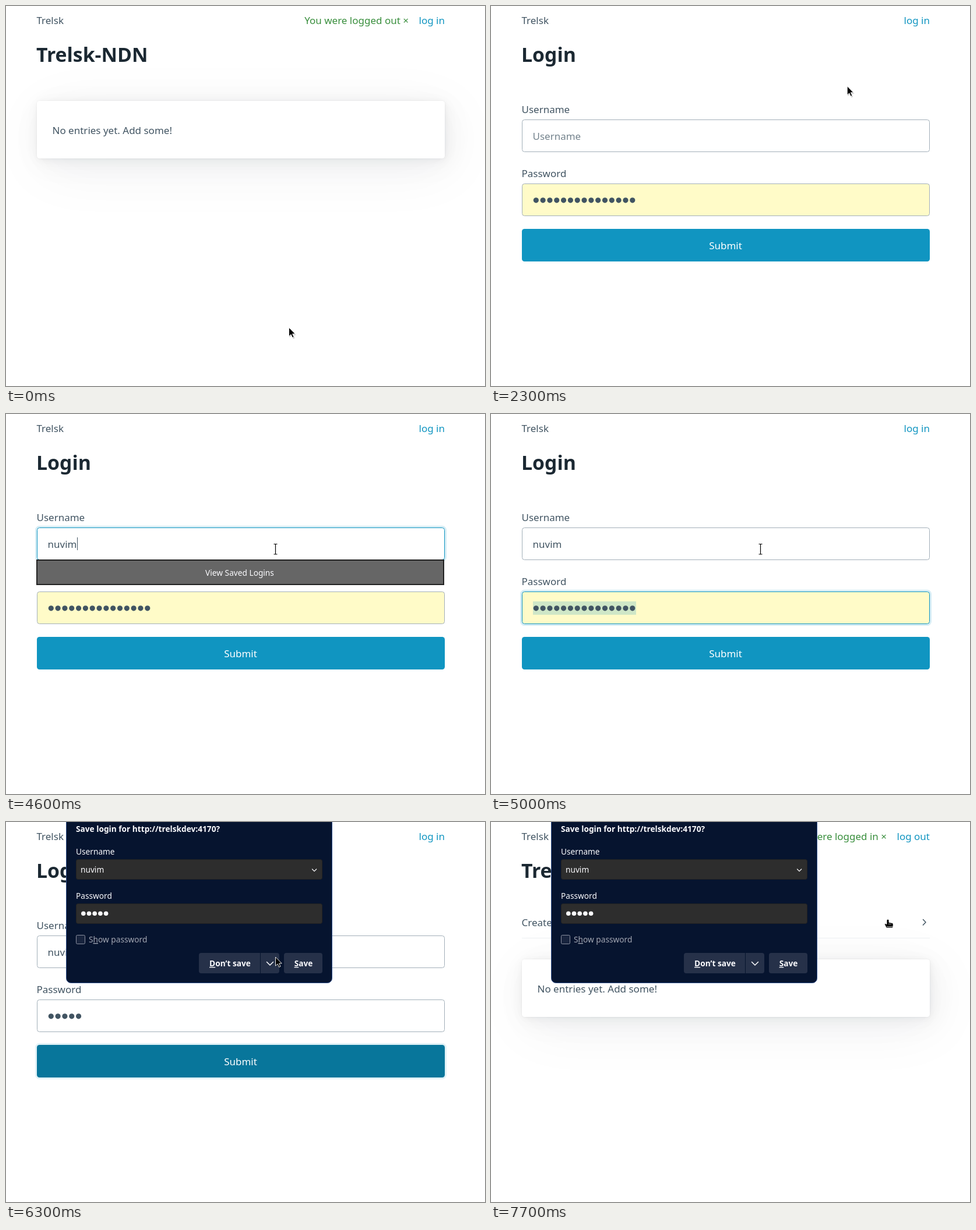
Write an HTML page that moves like this. It is 822 px wide and 653 px high and loops after 8000 ms.

```html
<!DOCTYPE html>
<html lang="en">
<head>
<meta charset="utf-8">
<title>Login demo</title>
<style>
  html, body { margin: 0; width: 100%; height: 100%; overflow: hidden; background: #fff; }
  svg { position: absolute; left: 0; top: 0; display: block; }
  text { font: 17px "Noto Sans", sans-serif; fill: #415462; white-space: pre; }
  .h1 { font-size: 33.8px; font-weight: 700; fill: #1b2832; }
  .end { text-anchor: end; }
  .mid { text-anchor: middle; }
  .small, #pop text { font-size: 13.7px; fill: #fbfbfe; }
  #pop .bold { font-weight: 700; }
  #pop .dim { fill: #a3a7b3; }
  .u { text-decoration: underline; }
  #msg { fill: #388e3c; }
  #card {
    position: absolute; left: 53px; width: 700px; height: 99px;
    border-radius: 4.5px; background: #fff;
  }
  .ring { fill: none; stroke: #1095c1; stroke-width: 3; }
  .line { fill: none; stroke-width: 1.5; stroke-linecap: round; stroke-linejoin: round; }
  .field { fill: #2d2d2d; stroke: #222; }
  .btn { fill: #263149; }
  .btn.over { fill: #434d66; }
</style>
</head>
<body>
<div id="card"></div>
<svg width="822" height="653" viewBox="0 0 822 653">
  <text x="52.5" y="31">Trelsk</text>
  <text id="msg" class="end" y="31"></text>
  <text id="link" class="end" x="753" y="31"></text>
  <text id="title" class="h1" x="52" y="96"></text>

  <text id="empty" x="79.5">No entries yet. Add some!</text>
  <g id="create">
    <text x="52.5" y="179">Create new entry</text>
    <path class="line" d="M741.5 167.5l4.5 4.8l-4.5 4.8" stroke="#415462"/>
    <path d="M53 199.5H753" stroke="#edf0f3"/>
  </g>

  <g id="form">
    <text x="52.5" y="184">Username</text>
    <rect id="nameRing" class="ring" x="51.5" y="193.5" width="703" height="59" rx="6"/>
    <rect id="nameBox" x="53.5" y="195.5" width="699" height="55" rx="4" fill="#fff"/>
    <text id="name" x="71.5" y="230"></text>
    <text x="52.5" y="294">Password</text>
    <rect id="passRing" class="ring" x="51.5" y="303.5" width="703" height="59" rx="6"/>
    <rect id="passBox" x="53.5" y="305.5" width="699" height="55" rx="4"/>
    <rect id="sel" x="72" y="322" width="177" height="23" fill="#1095c1" fill-opacity=".2"/>
    <g id="dots" fill="#415462"></g>
    <rect id="caret" width="1" height="22" fill="#415462"/>
    <rect id="subRing" class="ring" x="51.5" y="381.5" width="703" height="59" rx="6"/>
    <rect id="subBox" x="53" y="383" width="700" height="56" rx="4.5"/>
    <text class="mid" x="402.5" y="418" style="fill:#fff">Submit</text>
    <g id="drop">
      <rect x="53" y="251" width="698" height="42" fill="#666" stroke="#222" stroke-width="2"/>
      <text class="small mid" x="401" y="278">View Saved Logins</text>
    </g>
  </g>

  <g id="pop">
    <rect x="103.5" y="-20" width="456" height="296.5" rx="8" fill="#06142f" stroke="#2f4f8c"/>
    <text class="bold" x="120" y="17">Save login for http://trelskdev:4170?</text>
    <text x="120" y="56">Username</text>
    <rect class="field" x="120.5" y="64.5" width="422" height="34" rx="3"/>
    <text x="128" y="87">nuvim</text>
    <path class="line" d="M525.5 81l3.6 3.6l3.6-3.6" stroke="#fbfbfe" style="stroke-width:1.2"/>
    <text x="120" y="132">Password</text>
    <rect class="field" x="120.5" y="140.5" width="422" height="34" rx="3"/>
    <g id="popDots" fill="#fbfbfe"></g>
    <rect x="120.5" y="194.5" width="15" height="15" rx="2" fill="#18243e" stroke="#8b90a0"/>
    <text class="dim" x="142" y="207">S<tspan class="u">h</tspan>ow password</text>
    <path class="btn" d="M436 225H335a4 4 0 0 0-4 4V256a4 4 0 0 0 4 4H436z"/>
    <path class="btn" d="M437 225H465a4 4 0 0 1 4 4V256a4 4 0 0 1-4 4H437z"/>
    <rect class="btn" x="477" y="225" width="66" height="35" rx="4"/>
    <text class="bold mid" x="384.5" y="248"><tspan class="u">D</tspan>on’t save</text>
    <path class="line" d="M447.5 240.5l5.5 5.5l5.5-5.5" stroke="#fbfbfe"/>
    <text class="bold mid" x="510.5" y="248"><tspan class="u">S</tspan>ave</text>
  </g>

  <g id="cursor" stroke-linejoin="round">
    <g id="arrow">
      <path d="M1 1V17l3.7-3.2l2.7 5.6l2.6-1.2l-2.6-5.3h5z" opacity=".2"/>
      <path d="M0 0V15.2l3.6-3.3l2.5 5.5l2.5-1.1l-2.5-5.3h4.7z" stroke="#fff" stroke-width=".9"/>
    </g>
    <g id="beam" fill="none">
      <path d="M-3.5-8.5H3.5M0-8.5V9M-3.5 9H3.5" stroke="#fff" stroke-width="3.4"/>
      <path d="M-3-8.5H3M0-8.5V9M-3 9H3" stroke="#000" stroke-width="1.2"/>
    </g>
    <g id="hand" stroke="#fff">
      <path d="M-2 1Q0-2 2 1V5L8 6Q9.5 7 9.2 10L8.5 14.5H-2.5L-5.5 8.5Q-5.5 6-3 7.5L-2 8z" stroke-width=".9"/>
      <path d="M2.2 6.5V9M5 7V9M-2 12.3H8" stroke-width=".8"/>
    </g>
  </g>
</svg>
<script>
const LOOP = 8000, STEP = 100, USER = "nuvim", DOT = 11.82;
const $ = id => document.getElementById(id);
const set = (id, key, v) => $(id).setAttribute(key, v);
const show = (id, on) => { $(id).style.display = on ? "" : "none"; };
const label = (id, s) => { if ($(id).textContent !== s) $(id).textContent = s; };

const clamp = (v, lo, hi) => Math.min(hi, Math.max(lo, v));
const ramp = (t, a, b) => clamp((t - a) / (b - a), 0, 1);
const smooth = k => k * k * (3 - 2 * k);
const mix = (a, b, k) => `rgb(${a.map((v, i) => Math.round(v + (b[i] - v) * k))})`;
const GREY = [162, 175, 185], BLUE = [16, 149, 193], DEEP = [8, 118, 155];

// n characters typed evenly over a number of steps
const burst = (t, from, n, steps) =>
  clamp(Math.ceil(n * ((t - from) / STEP + 1) / steps), 0, n);

// each move starts where the last one ended and curves past its bend
const HOME = [485.5, 552.5];
const moves = [
  { from: 0, till: 900, bend: [846, -65], to: [686, 29] },
  { from: 1200, till: 1400, bend: [684, 24], to: [681.5, 20] },
  { from: 1690, till: 2500, bend: [858, -38], to: [520, 205] },
  { from: 2500, till: 2900, bend: [480, 235], to: [462.5, 232] },
  { from: 6970, till: 7700, bend: [987, 289], to: [681, 167.5] }
];
function pointer(t) {
  return moves.reduce((p, m) => {
    const k = smooth(ramp(t, m.from, m.till)), q = 1 - k;
    return p.map((v, i) => q * q * v + 2 * q * k * m.bend[i] + k * k * m.to[i]);
  }, HOME);
}

function addDots(id, n, x, gap, y, r) {
  for (let i = 0; i < n; i++) {
    const c = document.createElementNS("http://www.w3.org/2000/svg", "circle");
    c.setAttribute("cx", x + i * gap);
    c.setAttribute("cy", y);
    c.setAttribute("r", r);
    $(id).append(c);
  }
}
addDots("dots", 15, 77.3, DOT, 333.8, 4.6);
addDots("popDots", 5, 132.8, 9.7, 157.3, 3.8);

// soft shadow: each layer is about twice as deep as the one before
$("card").style.boxShadow = Array.from({ length: 6 }, (_, i) => {
  const y = .52 * 2.02 ** i;
  return `${y / 2}px ${y}px ${y * 6}px rgba(27,40,50,${.015 + .0078 * i})`;
}).concat("0 0 0 1px rgba(27,40,50,.015)").join();

function field(id, focus, fill) {
  set(id + "Ring", "stroke-opacity", focus * .17);
  set(id + "Box", "stroke", mix(GREY, BLUE, focus));
  set(id + "Box", "fill", fill);
}

function drawForm(t) {
  const n = burst(t, 4000, 2, 2) + burst(t, 4500, 3, 2);
  const fresh = t >= 5300, p = fresh ? burst(t, 5300, 5, 4) : 15;
  const sub = ramp(t, 5850, 6100);
  field("name", ramp(t, 2800, 3000) - ramp(t, 4700, 5000), "#fff");
  field("pass", ramp(t, 4700, 5000) - ramp(t, 5900, 6100), fresh ? "#fff" : "#fffbc8");
  set("subRing", "stroke-opacity", sub * .125);
  set("subBox", "fill", mix(BLUE, DEEP, sub));

  label("name", n ? USER.slice(0, n) : "Username");
  $("name").style.fill = n ? "" : "#73828c";
  [...$("dots").children].forEach((c, i) => { c.style.display = i < p ? "" : "none"; });
  show("drop", t >= 4000 && t < 4700);
  show("sel", t >= 4800 && !fresh);

  const inName = t >= 3100 && t < 4800, inPass = fresh && t < 5800;
  show("caret", inName || inPass);
  const end = inPass ? p * DOT : n ? $("name").getComputedTextLength() : 0;
  set("caret", "x", Math.round(72 + end));
  set("caret", "y", inPass ? 322 : 212);
}

function draw(t) {
  const login = t >= 2200 && t < 6400, inside = t >= 6400, pop = t >= 6300;
  const msg = t < 900 || inside;
  const [x, y] = pointer(t);
  const over = (x0, x1, y0, y1) => x >= x0 && x <= x1 && y >= y0 && y <= y1;

  show("form", login);
  show("card", !login);
  show("empty", !login);
  show("create", inside);
  show("pop", pop);
  show("msg", msg);
  $("card").style.top = inside ? "236px" : "163px";
  set("empty", "y", inside ? 293 : 220);
  label("title", login ? "Login" : "Trelsk-NDN");
  label("link", inside ? "log out" : "log in");
  label("msg", inside ? "You were logged in ×" : "You were logged out ×");
  set("msg", "x", inside ? 679 : 691);
  if (login) drawForm(t);

  const onLink = over(708, 753, 12, 38);
  $("link").style.fill = onLink ? "#08769b" : "#1095c1";
  $("link").style.textDecoration = onLink ? "underline" : "none";
  for (const b of document.querySelectorAll(".btn")) {
    const r = b.getBBox();
    b.classList.toggle("over",
      t >= 7000 && over(r.x, r.x + r.width, r.y, r.y + r.height));
  }

  const inPop = pop && over(104, 559, 0, 276);
  const beam = login && !inPop && over(53, 753, 195, 361);
  const onClose = msg && !inside && over(678, 692, 15, 36);
  const onCreate = inside && over(53, 753, 160, 188);
  const hand = !inPop && (onLink || onClose || onCreate);
  show("beam", beam);
  show("hand", hand);
  show("arrow", !beam && !hand);
  set("cursor", "transform", `translate(${x} ${y})`);
}

const start = performance.now();
function tick() {
  const t = Math.max(0, performance.now() - start) % LOOP;
  draw(Math.floor(t / STEP) * STEP);
  requestAnimationFrame(tick);
}
tick();
</script>
</body>
</html>
```
